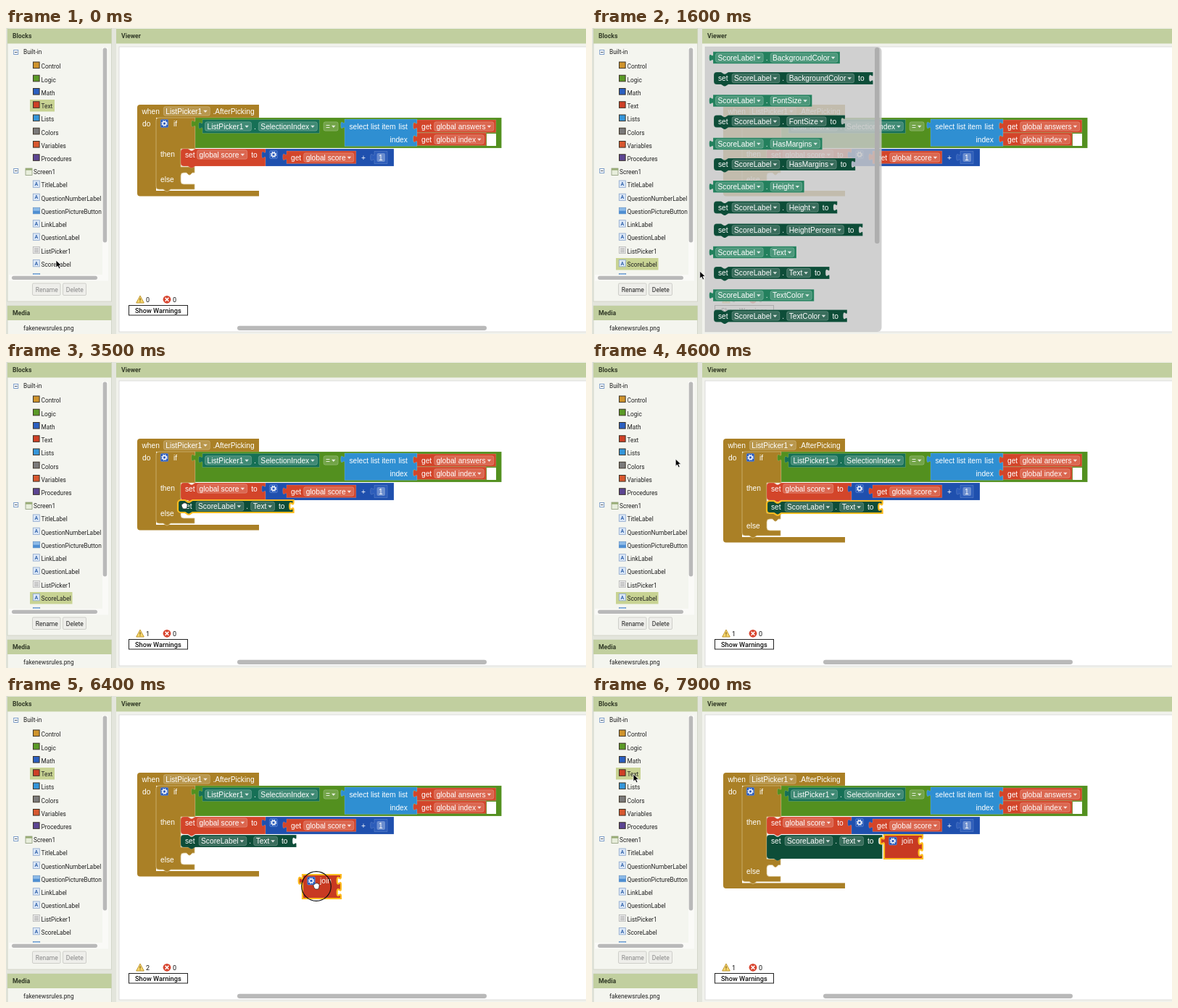
Write an HTML page that moves like this. It is 800x423 px and loops after 8000 ms.

```html
<!DOCTYPE html>
<html lang="en">
<head>
<meta charset="utf-8">
<title>Block editor</title>
<style>
html, body { margin: 0; width: 100%; height: 100%; overflow: hidden; background: #e3e5dc; }
svg { display: block; width: 100%; height: 100%; }
text { white-space: pre; }
.ui { font-family: Roboto, sans-serif; }
.blk { font-family: "Liberation Sans", Arial, sans-serif; font-size: 10.2px; fill: #fff; }
</style>
</head>
<body>
<svg id="stage" viewBox="0 0 800 423"></svg>
<script>
const COLOR = {
  gold: '#aa8026', logic: '#53901f', math: '#1f50ae', text: '#c83a22', list: '#2f8fd2',
  vars: '#d3452a', getter: '#23805d', setter: '#0d4d38', teal: '#167056', lit: '#fdbc1f'
};
const LOOP = 8000, STEP = 100;
const pen = document.createElement('canvas').getContext('2d');
pen.font = '10.2px "Liberation Sans", Arial, sans-serif';
const measure = s => pen.measureText(s).width;

// ---- primitives
const rect = (x, y, w, h, fill, more = '') =>
  `<rect x="${x}" y="${y}" width="${w}" height="${h}" fill="${fill}" ${more}/>`;
const path = (d, fill, more = '') => `<path d="${d}" fill="${fill}" ${more}/>`;
const group = (id, body, more = '') => `<g id="${id}" ${more}>${body}</g>`;
const label = (x, cy, s, size = 8.3, fill = '#222', weight = 400) =>
  `<text class="ui" x="${x}" y="${cy + size * .36}" font-size="${size}" font-weight="${weight}" fill="${fill}">${s}</text>`;
const word = (x, cy, s) => `<text class="blk" x="${x}" y="${cy + 3.5}">${s}</text>`;
const bar = (x, y, w, h, fill = '#b9b9b9') => rect(x, y, w, h, fill, `rx="${Math.min(w, h) / 2}"`);

function pill(x, cy, s) {
  const w = measure(s), a = x + 3 + w + 4.8;
  return rect(x, cy - 6.2, w + 14.2, 12.4, '#fff', 'rx="2.5" fill-opacity=".18" stroke="#fff" stroke-opacity=".3" stroke-width=".7"') +
    word(x + 3, cy, s.replace('<', '&lt;')) +
    path(`M${a - 2.8} ${cy - 1.3}h5.6l-2.8 3.3z`, '#fff', 'fill-opacity=".8"');
}

// Strings are words, arrays are drop-downs, numbers adjust the gap.
function row(x, cy, items) {
  let svg = '', end = x;
  for (const it of items) {
    if (typeof it === 'number') { x += it; continue; }
    const drop = Array.isArray(it), s = drop ? it[0] : it;
    svg += drop ? pill(x, cy, s) : word(x, cy, s);
    end = x + measure(s) + (drop ? 14.2 : 0);
    x = end + 5.5;
  }
  return { svg, end };
}

function block(fill, x, y, w, h, { tab, stmt, holes = [], lit } = {}) {
  let d = stmt ? `M${x} ${y + 4}a4 4 0 0 1 4 -4h6l4 2.6h2l4 -2.6` : `M${x} ${y}`;
  d += `H${x + w}`;
  for (const k of holes) d += `V${y + k}c0 6.6 -5.3 -5.3 -5.3 5s5.3 -1.7 5.3 5`;
  d += `V${y + h}`;
  d += stmt ? `H${x + 20}l-4 2.6h-2l-4 -2.6H${x + 4}a4 4 0 0 1 -4 -4` : `H${x}`;
  if (tab) d += `V${y + 13.3}c0 -6.6 -5.3 5.3 -5.3 -5s5.3 1.7 5.3 -5`;
  const edge = lit ? `stroke="${COLOR.lit}" stroke-width="2.2"` : 'stroke="#fff" stroke-opacity=".22" stroke-width=".7"';
  return path(d + 'z', fill, edge);
}

function gear(cx, cy) {
  return rect(cx - 5.3, cy - 5.5, 10.6, 11, '#2a5cbd', 'rx="1.5" stroke="#6d92d8" stroke-width=".6"') +
    `<circle cx="${cx}" cy="${cy}" r="3.5" fill="none" stroke="#fff" stroke-width="1.5" stroke-dasharray="1.5 1.25"/>` +
    `<circle cx="${cx}" cy="${cy}" r="2.3" fill="none" stroke="#fff" stroke-width="1.2"/>`;
}

// ---- block kinds
const dotted = (a, b) => [[a], -2, '.', -2, [b]];

function setter(x, y, prop, { lit, h = 17 } = {}) {
  const r = row(x + 6, y + 8.5, ['set', ...dotted('ScoreLabel', prop), 'to']);
  return block(COLOR.setter, x, y, r.end + 12 - x, h, { stmt: true, holes: [3.3], lit }) + r.svg;
}
function getter(x, y, comp, prop, fill = COLOR.getter, h = 16.5) {
  const r = row(x + 3.5, y + h / 2, dotted(comp, prop));
  return block(fill, x, y, r.end + 3 - x, h, { tab: true }) + r.svg;
}
function variable(x, y, name) {
  const r = row(x + 6, y + 9, ['get', -2, [name]]);
  return block(COLOR.vars, x, y, r.end + 3 - x, 17.5, { tab: true }) + r.svg;
}
const join = (x, y, lit) =>
  block(COLOR.text, x, y, 53, 33, { tab: true, holes: [3.3, 19.5], lit }) + gear(x + 12, y + 8.5) + word(x + 24, y + 8.5, 'join');

// ---- workspace; "grow" is the extra height of the "then" branch
function workspace(grow, extra) {
  const g = grow, gold = COLOR.gold;
  let s = path(`M181 110a4 4 0 0 1 4 -4H349V124H207V${225 + g}H349V${232.5 + g}H185a4 4 0 0 1 -4 -4z`, gold);
  s += row(187.5, 115, ['when', ['ListPicker1'], -1.5, '.AfterPicking']).svg + word(188, 132, 'do');
  s += path(`M207 128a4 4 0 0 1 4 -4H261V167H241V${192 + g}H260V${200 + g}h-3l-3 3h-2l-3 -3h-4a4 4 0 0 0 -4 4V${212 + g}a4 4 0 0 0 4 4H260V${223 + g}H227l-4 3h-2l-4 -3H211a4 4 0 0 1 -4 -4z`,
    gold, 'stroke="#d0b679" stroke-width=".8"');
  s += gear(218.5, 132) + word(231, 132, 'if') + word(213, 174.5, 'then') + word(213, 209 + g, 'else');
  s += block(COLOR.logic, 261, 124, 422.5, 42, { tab: true });
  s += getter(271, 126.5, 'ListPicker1', 'SelectionIndex', COLOR.teal, 19) + pill(438, 136, '=');
  s += rect(663, 146, 13, 17, '#fff');
  s += block(COLOR.list, 467, 126, 100, 37.5, { tab: true, holes: [4, 22] });
  s += word(473.5, 136, 'select list item') + word(541.5, 136, 'list') + word(529.5, 154, 'index');
  s += variable(567, 127, 'global answers') + variable(567, 145, 'global index');
  s += block(COLOR.vars, 241, 167, 117, 24, { stmt: true });
  s += row(247, 175, ['set', -2.5, ['global score'], 'to']).svg;
  s += block(COLOR.math, 358, 167, 177, 24, { tab: true }) + gear(369, 175);
  s += variable(387, 170, 'global score') + word(490, 179, '+');
  s += block('#2d5dba', 508, 170.5, 18, 17, { tab: true }) + rect(511.5, 173, 11.5, 12, '#fff', 'rx="2" fill-opacity=".3"') + word(514, 179, '1');
  return s + extra;
}

// ---- palettes
function palette(right, thumbX, thumbH, body) {
  return path(`M156 26H${right - 6}a6 6 0 0 1 6 6V414a6 6 0 0 1 -6 6H156z`, '#c7c7c7', 'fill-opacity=".84"') +
    `<g clip-path="url(#view)">${body}</g>` + bar(thumbX, 27, 6.5, thumbH, '#aeaeae');
}

function scorePalette() {
  const gets = [['BackgroundColor', 41], ['FontSize', 100.5], ['HasMargins', 160], ['Height', 219.3], ['Text', 310], ['TextColor', 369.5]];
  const sets = [['BackgroundColor', 69.5], ['FontSize', 129], ['HasMargins', 188.5], ['Height', 248],
    ['HeightPercent', 279], ['Text', 338.5], ['TextColor', 398]];
  return palette(399.5, 390, 271,
    gets.map(([p, y]) => getter(167, y - 8.2, 'ScoreLabel', p)).join('') +
    sets.map(([p, y]) => setter(168, y - 8.5, p)).join('') +
    group('litSet', setter(168, 330, 'Text', { lit: true })));
}

function textPalette() {
  const red = (y, w, h, holes) => block(COLOR.text, 167, y, w, h, { tab: true, holes });
  const one = (cy, w, items, x = 173) => red(cy - 8.3, w, 16.6, [3.3]) + row(x, cy, items).svg;
  const two = (y, w, items, x, low, lowX) =>
    red(y, w, 33, [3.3, 19.5]) + row(x, y + 8.5, items).svg + word(lowX, y + 25, low);
  const hole = x => rect(x, 167, 10, 13, '#e2b3a8');
  return palette(320.5, 310.5, 274,
    red(33, 36, 16.5) + word(172, 42, '“') + rect(180, 35.5, 10, 11.5, '#fff', 'rx="2" fill-opacity=".45"') + word(195, 42, '”') +
    join(167, 61) + one(114, 46, ['length']) + one(142, 56, ['is empty']) +
    red(163, 142, 22) + word(173, 173, 'compare texts') + hole(247) + pill(260, 173, '<') + hole(292) +
    one(204.5, 36, ['trim']) + one(232.5, 60.5, [['upcase']], 170) +
    two(252.5, 76, ['starts at', -1, 'text'], 173, 'piece', 206) +
    two(297, 78, ['contains', 'text'], 173, 'piece', 208) +
    two(342, 69, [['split'], -1, 'text'], 170, 'at', 215) +
    one(394.5, 82, ['split at spaces']) + red(414, 79, 16));
}

// ---- page frame
function sidebar() {
  const top = 53, gap = 18.25, green = '#c1cf9f', ink = '#333b28';
  const drawers = [['Control', '#cf942c'], ['Logic', '#5a9a26'], ['Math', '#2b5fc0'], ['Text', '#cf4026'],
    ['Lists', '#3596da'], ['Colors', '#7b7b7b'], ['Variables', '#d8582f'], ['Procedures', '#5c4593']];
  const parts = ['TitleLabel', 'QuestionNumberLabel', 'QuestionPictureButton', 'LinkLabel', 'QuestionLabel', 'ListPicker1', 'ScoreLabel', ''];
  const fold = y => rect(10.7, y - 3, 6, 6, '#fff', 'stroke="#6f93c4" stroke-width=".9"') + path(`M12 ${y}h3.5`, 'none', 'stroke="#345" stroke-width=".9"');

  let s = rect(0, 0, 800, 423, '#e3e5dc');
  s += rect(2, 0, 143.5, 378, '#f4f5ef', 'stroke="#ccd0c2" stroke-width=".8"') + rect(2, 1, 143.5, 20.5, green);
  s += rect(2, 384, 143.5, 40, '#f4f5ef', 'stroke="#ccd0c2" stroke-width=".8"') + rect(2, 384, 143.5, 20, green);
  s += rect(152, 0, 648, 423, '#f1f2ec') + rect(152, 1, 648, 20.5, green);
  s += rect(156, 26, 650, 394, '#fff', 'stroke="#d4d4d4" stroke-width=".8"');
  s += label(9, 11.3, 'Blocks', 8.7, ink, 700) + label(159, 11.3, 'Viewer', 8.7, ink, 700) + label(9, 393.5, 'Media', 8.7, ink, 700);
  s += label(24, 415, 'fakenewsrules.png');
  s += group('pickText', rect(33, 99, 34, 16.5, '#c8d393')) + group('pickScore', rect(33, 318, 58.5, 16.5, '#c8d393'));

  let tree = fold(33.5) + label(24, 33.5, 'Built-in') + fold(197.5) + label(38, 199, 'Screen1');
  tree += rect(27, 194, 9, 9.5, '#e8eedc', 'stroke="#8d9a78" stroke-width=".8"') + rect(27, 194, 9, 2.6, '#97ab75');
  drawers.forEach(([name, c], i) => {
    const y = top + i * gap;
    tree += rect(37.5, y - 6, 8.6, 8.6, c, 'stroke="#3c3428" stroke-width="1"') + label(48.5, y + .3, name);
  });
  parts.forEach((name, i) => {
    const y = top + (i + 9) * gap, x = 37.3;
    if (i === 2 || i === 7) tree += rect(x, y - 5.5, 9.4, 8.6, '#8dbbe8', 'stroke="#6590c0" stroke-width=".7"') + rect(x, y - 1, 9.4, 4, '#4f8fd2');
    else if (i === 5) tree += rect(x, y - 6, 9, 9, '#eee', 'stroke="#aaa" stroke-width=".7"') + path(`M39 ${y - 3.5}h6m-6 2.2h6m-6 2.2h6`, 'none', 'stroke="#999" stroke-width=".9"');
    else tree += rect(x, y - 6.3, 9, 9.4, '#dce8f7', 'stroke="#8ba6cc" stroke-width=".8"') + label(39.4, y - 1.6, 'A', 7, '#3465ac', 700);
    tree += label(48.5, y + .2, name);
  });
  s += `<g clip-path="url(#tree)">${tree}</g>`;
  s += rect(133, 27, 8, 314, '#fafaf7') + bar(133.7, 27.5, 5.5, 269) + rect(4, 341, 137, 8.5, '#fafaf7') + bar(8, 342.7, 118, 5.2);
  for (const [x, w, name] of [[36.5, 38.5, 'Rename'], [78.5, 32, 'Delete']])
    s += rect(x, 353, w, 16.5, '#eeeeea', 'rx="1.5" stroke="#c6c6c0" stroke-width=".8"') + label(x + 4.3, 361.5, name, 8.5, 'currentColor');
  return group('side', s);
}

const warnings = path('M185 370l5.3 10h-10.6z', '#f6d66a', 'stroke="#b98f2a" stroke-width=".9" stroke-linejoin="round"') +
  path('M185 373.5v3.2m0 1v1.1', 'none', 'stroke="#6b4a10" stroke-width="1.1"') +
  '<circle cx="222" cy="375.3" r="5.4" fill="#d8452f"/>' +
  path('M219.6 372.9l4.8 4.8m0 -4.8l-4.8 4.8', 'none', 'stroke="#fff" stroke-width="1.5"') +
  '<text id="count" class="ui" x="193" y="379" font-size="9" fill="#111">0</text>' + label(230, 375.8, '0', 9, '#111') +
  rect(169.5, 383.5, 81, 13.5, '#fff', 'stroke="#222" stroke-width="1"') + label(178, 390.3, 'Show Warnings', 9.2, '#111', 500);

const pointer = path('M0 0V10.2L2.4 8L4.1 11.8L6 11L4.3 7.3H7.6z', '#000', 'stroke="#fff" stroke-width=".8"');
const fist = path('M-4 -1q0 -2 2 -2q.6 -1.6 2 -1q1.4 -.8 2.2 .5q2 -.2 1.9 2q.2 3 -1.5 5.5h-4q-2.4 -2.4 -2.6 -5z', '#fff', 'stroke="#222" stroke-width=".7"');

document.getElementById('stage').innerHTML =
  '<clipPath id="view"><rect x="156" y="26" width="644" height="394"/></clipPath>' +
  '<clipPath id="tree"><rect x="2" y="22" width="130.5" height="319"/></clipPath>' +
  sidebar() + warnings +
  group('ws0', workspace(0, '')) +
  group('ws1', workspace(17, setter(241, 192, 'Text') + group('litPlaced', setter(241, 192, 'Text', { lit: true })))) +
  group('ws2', workspace(33.5, setter(241, 192, 'Text', { h: 33 }) + join(403, 192, true))) +
  group('scorePal', scorePalette()) + group('textPal', textPalette()) +
  group('hbar', bar(319, 411.7, 344, 6.3)) +
  group('dragSet', setter(0, 0, 'Text', { lit: true })) + group('dragJoin', join(0, 0, true)) +
  group('mouse', group('pointer', pointer) + group('fist', fist) +
    '<circle id="ring" r="20.3" fill="none" stroke="#111" stroke-width="1.2"/>');

// ---- timeline
const SPANS = {
  pickText: [[0, 500], [5300, LOOP]], pickScore: [[500, 5300]],
  ws0: [[0, 3600]], ws1: [[3600, 7100]], ws2: [[7100, LOOP]],
  scorePal: [[600, 2500]], textPal: [[5400, 6200]],
  hbar: [[0, 600], [2400, 5400], [6100, LOOP]],
  litSet: [[2200, 2500]], litPlaced: [[3600, 6100]],
  dragSet: [[2500, 3600]], dragJoin: [[6200, 7100]],
  ring: [[2200, 3500], [6000, 7100]]
};
const TRACK = [
  [0, 69, 321], [400, 65, 328], [1000, 65, 328], [1900, 178, 339], [2200, 178, 339],
  [2400, 224, 272], [3200, 246, 199], [3900, 246, 199], [5000, 59, 106], [5500, 59, 106],
  [5900, 186, 77], [6000, 186, 77], [6400, 428, 263], [6900, 421, 209], [7200, 421, 209],
  [7800, 57, 108], [8000, 57, 108]
];
const el = id => document.getElementById(id);
const show = (id, on) => { el(id).style.display = on ? '' : 'none'; };
const place = (id, x, y) => el(id).setAttribute('transform', `translate(${x} ${y})`);

function mouseAt(t) {
  const i = TRACK.findIndex(k => k[0] > t);
  const [t0, x0, y0] = TRACK[i - 1], [t1, x1, y1] = TRACK[i];
  const u = (t - t0) / (t1 - t0), e = u * u * (3 - 2 * u);
  return [x0 + (x1 - x0) * e, y0 + (y1 - y0) * e];
}

function draw(t) {
  for (const id in SPANS) show(id, SPANS[id].some(([a, b]) => t >= a && t < b));
  const [x, y] = mouseAt(t);
  place('mouse', x, y);
  place('dragSet', x - 9, y - 8);
  place('dragJoin', x - 19, y - 16);
  show('fist', x > 160);
  show('pointer', x <= 160);
  el('count').textContent = t < 2500 ? 0 : t < 6200 ? 1 : t < 7100 ? 2 : 1;
  el('side').style.color = t >= 500 && t < 5300 ? '#222' : '#888';
}

const start = performance.now();
function tick() {
  const t = (performance.now() - start) % LOOP;
  draw(Math.floor(t / STEP) * STEP);
  requestAnimationFrame(tick);
}
tick();
</script>
</body>
</html>
```
